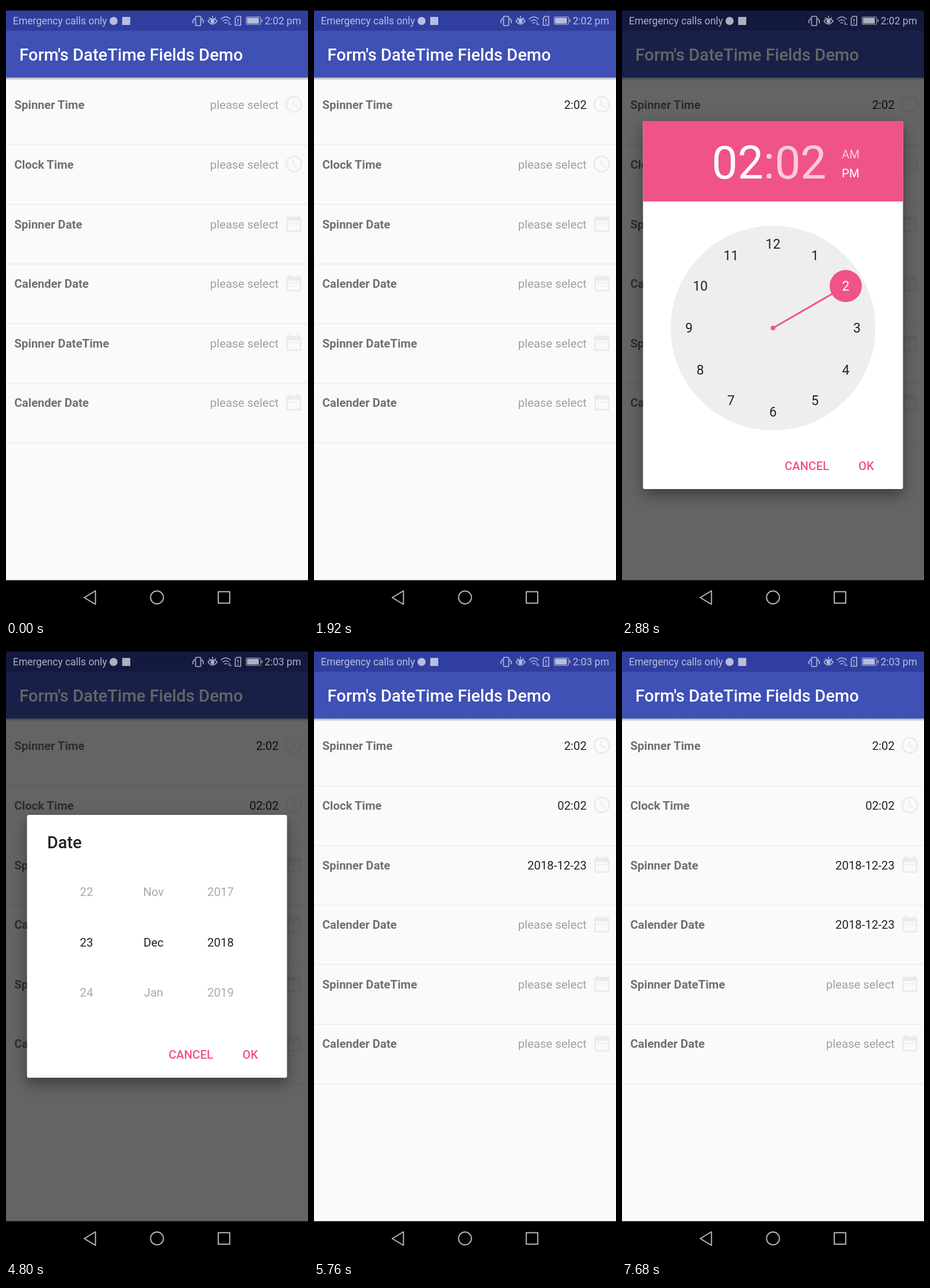
An HTML page that plays this animation: 525x1066 px, repeating every 8000 ms.

```html
<!DOCTYPE html>
<html lang="en">
<head>
<meta charset="utf-8">
<style>
html, body { margin: 0; width: 100%; height: 100%; overflow: hidden; background: #000; }
svg { display: block; width: 525px; height: 1066px; font: 20.42px Roboto, sans-serif; }
.dialog { filter: drop-shadow(0 10px 12px rgba(0,0,0,.4)); }
</style>
</head>
<body>
<svg id="stage" viewBox="0 0 525 1066"></svg>
<script>
const LOOP = 8000, STEP = 960;
const PINK = '#f0528a', INK = '#222', FAINT = '#a9a9a9';
const LABELS = ['Spinner Time', 'Clock Time', 'Spinner Date', 'Calender Date', 'Spinner DateTime', 'Calender Date'];
const VALUES = ['2:02', '02:02', '2018-12-23', '2018-12-23'];
const CALENDAR = 'M9 11H7v2h2zM13 11h-2v2h2zM17 11h-2v2h2zM19 4h-1V2h-2v2H8V2H6v2H5c-1.1 0-2 .9-2 2v14c0 1.1.9 2 2 2h14c1.1 0 2-.9 2-2V6c0-1.1-.9-2-2-2zm0 16H5V9h14z';
const stage = document.getElementById('stage');

const text = (s, x, y, fill, more = '') => `<text x="${x}" y="${y}" fill="${fill}" ${more}>${s}</text>`;
const rect = (x, y, w, h, fill, more = '') => `<rect x="${x}" y="${y}" width="${w}" height="${h}" fill="${fill}" ${more}/>`;
const circle = (x, y, r, fill, more = '') => `<circle cx="${x}" cy="${y}" r="${r}" fill="${fill}" ${more}/>`;
const path = (d, more = '') => `<path d="${d}" ${more}/>`;
const mid = (s, x, y, fill, more = '') => text(s, x, y, fill, 'text-anchor="middle" ' + more);
const end = (s, x, y, fill, more = '') => text(s, x, y, fill, 'text-anchor="end" ' + more);
const medium = size => `font-weight="500" font-size="${size}"`;

function row(label, i, filled) {
  const y = 171.5 + i * 103.6;
  const icon = i < 2
    ? circle(12, 12, 9, 'none', 'stroke="#ebebeb" stroke-width="2"') + path('M12.5 7H11v6l5.25 3.15.75-1.23-4.5-2.67z')
    : path(CALENDAR, 'fill-rule="evenodd"');
  return text(label, 14.5, y + 7.8, '#707070', 'font-weight="700"')
    + (i < filled ? end(VALUES[i], 474, y + 7.8, INK) : end('please select', 474, y + 7.8, '#a0a0a0'))
    + `<g transform="translate(482.8 ${y - 18}) scale(1.458)" fill="#ebebeb">${icon}</g>`
    + rect(0, y + 69.2, 525, 1.5, '#ebebeb');
}

function statusBar(time) {
  const c = '#fff';
  return `<g opacity=".66" fill="none" stroke="${c}" stroke-width="1.6">`
    + text('Emergency calls only', 12, 32, c, 'font-size="17.5" stroke="none"')
    + circle(187, 26, 7, c, 'stroke="none"') + rect(202, 19, 14, 14, c, 'stroke="none"')
    + rect(329.5, 18, 9, 16, 'none', 'rx="1"') + path('M327 21v4M325 24v6M341 21v4M343 24v6')
    + path('M351 26q8-8 16 0q-8 11-16 0M353 20l2 2M359 17v3M365 20l-2 2') + circle(359, 26.5, 2.6, c)
    + path('M373.5 23q8.5-8 17 0M376.5 26.5q5.5-5 11 0M379.5 30q2.5-2.5 5 0M388 28v5M391 31v2')
    + path('M398.5 21l3-3h6.5v15.500h-9.500zM403.300 22v5M403.300 29v2')
    + rect(417.5, 19, 25, 13, 'none', 'rx="1" stroke-width="1"') + rect(419, 20.5, 20.5, 10, c, 'stroke="none"')
    + path('M445 23v5')
    + end(time + ' pm', 513, 32, c, 'font-size="17.5" stroke="none"') + '</g>';
}

function navBar() {
  return rect(0, 998.5, 525, 68, '#000')
    + '<g fill="none" stroke="#bdbdbd" stroke-width="1.9" stroke-linejoin="round">'
    + path('M155.500 1017v23.500l-19.500-11.750z') + circle(262.5, 1028.500, 11.2, 'none')
    + rect(369, 1018.500, 20, 20, 'none') + '</g>';
}

function dialog(top, bottom, body) {
  const y = bottom - 32.7;
  return '<g class="dialog">' + rect(36.5, top, 452, bottom - top, '#fff', 'rx="3"') + '</g>' + body
    + end('CANCEL', 360, y, PINK, medium(20.42)) + end('OK', 438, y, PINK, medium(20.42));
}

function spinner(title, columns) {
  const wheels = columns.map((items, i) => items.map((s, j) =>
    mid(s, 140 + i * 116.5, 433.3 + j * 87.5, j == 1 ? INK : FAINT)).join(''));
  return dialog(292, 749, text(title, 71.5, 350, INK, medium(29.17)) + wheels.join(''));
}

function clockPicker() {
  const cx = 262.5, cy = 560, r = 178;
  let body = rect(36.5, 200, 452, 140, PINK) + end('02', 246, 300, '#fff', 'font-size="80"')
    + text(':02', 246, 300, '#fff', 'font-size="80" opacity=".7"')
    + text('AM', 382, 265, '#fff', 'opacity=".7"') + text('PM', 382, 298, '#fff')
    + circle(cx, cy, r, '#eee') + circle(cx, cy, 4, PINK);
  for (let h = 1; h <= 12; h++) {
    const a = h * Math.PI / 6, x = cx + 146 * Math.sin(a), y = cy - 146 * Math.cos(a);
    if (h == 2) body += path(`M${cx} ${cy}L${x} ${y}`, `stroke="${PINK}" stroke-width="3"`) + circle(x, y, 28, PINK);
    body += mid(h, x, y + 8, h == 2 ? '#fff' : INK, 'font-size="23"');
  }
  return dialog(200, 840, body);
}

function calendarPicker() {
  const column = i => 80 + i * 60.8;
  let body = rect(36.5, 167, 452, 140, PINK) + text('2018', 71.5, 217, '#fff', 'opacity=".7" font-size="23"')
    + text('Sun, Dec 23', 71.5, 274, '#fff', medium(49))
    + mid('December 2018', 262.5, 355, INK, medium(20.42));
  [...'SMTWTFS'].forEach((s, i) => body += mid(s, column(i), 412, '#888', 'font-size="17.5"'));
  for (let d = 1; d <= 31; d++) {
    const x = column((d + 5) % 7), y = 460 + Math.floor((d + 5) / 7) * 61;
    if (d == 23) body += circle(x, y - 6, 27, PINK);
    body += mid(d, x, y, d == 23 ? '#fff' : INK, 'font-size="17.5"');
  }
  return dialog(167, 873, body);
}

const pickers = [
  () => spinner('Time', [['1', '2', '3'], ['01', '02', '03'], ['AM', 'PM']]),
  clockPicker,
  () => spinner('Date', [[22, 23, 24], ['Nov', 'Dec', 'Jan'], [2017, 2018, 2019]]),
  calendarPicker
];

// Even steps show the form, odd steps the picker for the next empty field.
function draw(step) {
  const filled = step >> 1;
  const open = step % 2 == 1;
  stage.innerHTML = '<defs><linearGradient id="shade" x2="0" y2="1"><stop stop-opacity=".3"/><stop offset="1" stop-opacity="0"/></linearGradient></defs>'
    + rect(0, 8, 525, 991, '#fafafa')
    + LABELS.map((s, i) => row(s, i, filled)).join('')
    + rect(0, 124.5, 525, 5, 'url(#shade)')
    + rect(0, 8, 525, 35, '#303f9f') + rect(0, 43, 525, 81.5, '#3f51b5')
    + text("Form's DateTime Fields Demo", 23.3, 95.3, '#fff', medium(29.17))
    + (open ? rect(0, 8, 525, 991, '#000', 'opacity=".6"') : '')
    + statusBar(step < 5 ? '2:02' : '2:03')
    + navBar()
    + (open ? pickers[filled]() : '');
}

let shown = -1;
function tick() {
  const step = Math.floor(performance.now() % LOOP / STEP);
  if (step != shown) draw(shown = step);
  requestAnimationFrame(tick);
}
tick();
</script>
</body>
</html>
```
